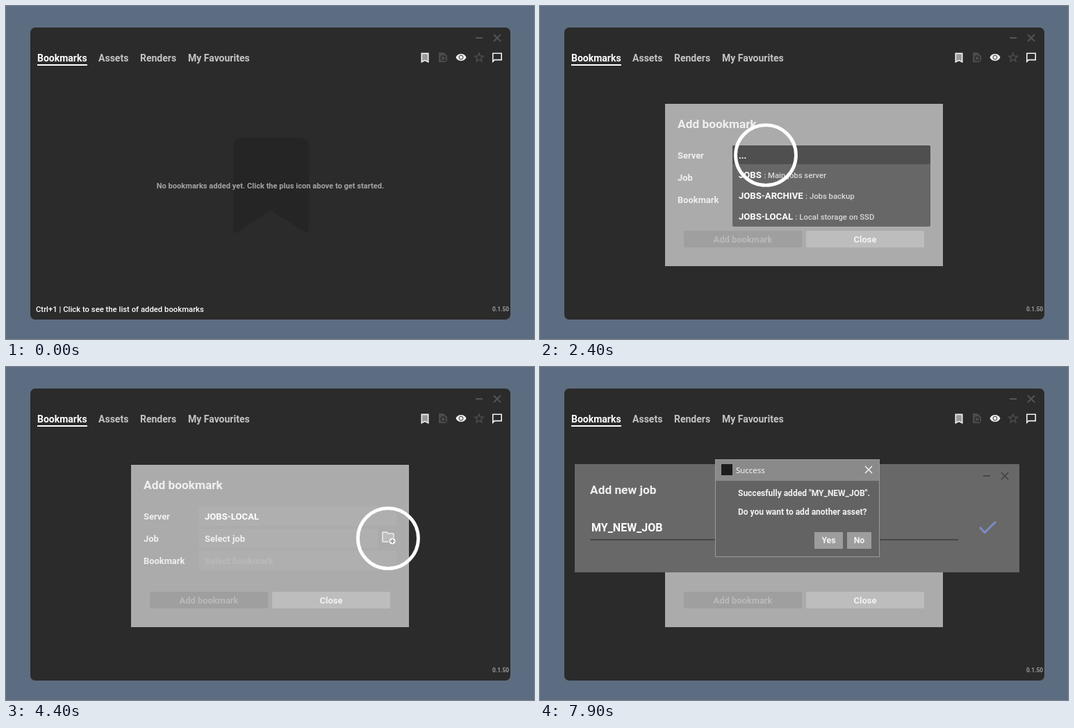
These frames come from a looping animation (760 px wide and 480 px high, 8000 ms). An HTML page with a canvas:

```html
<!DOCTYPE html>
<html lang="en">
<head>
<meta charset="utf-8">
<title>Adding a bookmark</title>
<style>
  html, body { margin: 0; width: 100%; height: 100%; overflow: hidden; background: #5d6d81; }
  canvas { display: block; }
</style>
</head>
<body>
<canvas id="stage" width="760" height="480"></canvas>
<script>
const ctx = document.getElementById('stage').getContext('2d');
const LOOP = 8000, STEP = 100;
const clamp = v => Math.max(0, Math.min(1, v));

function box(x, y, w, h, color, radius = 0) {
  ctx.fillStyle = color;
  ctx.beginPath();
  ctx.roundRect(x, y, w, h, radius);
  ctx.fill();
}

function text(str, x, y, size, color = '#fff', { weight = 700, align = 'left', family = 'Roboto' } = {}) {
  ctx.font = `${weight} ${size}px ${family}, sans-serif`;
  ctx.textAlign = align;
  ctx.fillStyle = color;
  ctx.fillText(str, x, y);
  return ctx.measureText(str).width;
}

// Draws an SVG-style path at an offset, filled and/or stroked.
function shape(x, y, d, { fill, stroke, width = 1.6 }) {
  const path = new Path2D(d);
  ctx.save();
  ctx.translate(x, y);
  if (fill) { ctx.fillStyle = fill; ctx.fill(path, 'evenodd'); }
  if (stroke) { ctx.strokeStyle = stroke; ctx.lineWidth = width; ctx.stroke(path); }
  ctx.restore();
}

// Runs draw() with a short fade that begins at the given time.
function appear(t, start, draw) {
  if (t < start) return;
  ctx.save();
  ctx.globalAlpha = clamp((t - start + 100) / 200);
  draw();
  ctx.restore();
}

function windowButtons(x, y, color) {
  shape(x, y, 'M-5 0h10', { stroke: color, width: 2 });
  shape(x + 26, y, 'M-5-5l10 10M5-5l-10 10', { stroke: color, width: 1.8 });
}

function toolbar() {
  const dim = '#4b4b4b', lit = '#f2f2f2';
  shape(603, 74.4, 'M-4.7-6h9.4v12.4l-4.7-2.4l-4.7 2.4z', { fill: '#9a9a9a', stroke: lit });
  shape(629, 74, 'M-6-7h7l5 5v8l-1 1h-11z', { fill: dim });
  shape(629, 74, 'M3.4 1.2a3.2 3.2 0 1 1-6.4 0a3.2 3.2 0 1 1 6.4 0M2.5 3.5l4 4', { stroke: '#2b2b2b', width: 1.4 });
  shape(655, 74, 'M-7.5 0C-5-6.6 5-6.6 7.5 0C5 6.6-5 6.6-7.5 0z', { fill: lit });
  shape(655, 74, 'M2.8 0a2.8 2.8 0 1 1-5.6 0a2.8 2.8 0 1 1 5.6 0', { stroke: '#555', width: 1.2 });
  shape(681, 74, 'M0-6l1.7 4l4.5.4l-3.4 3l1 4.4l-3.8-2.4l-3.8 2.4l1-4.4l-3.4-3l4.5-.4z', { stroke: dim });
  shape(707, 74.4, 'M-6.2-6.2h12.4v9.4h-10l-2.4 2.4z', { stroke: lit });
}

function mainWindow(t) {
  box(35, 31, 691, 421, '#2b2b2b', 7);
  windowButtons(681, 46, '#555');
  text('Bookmarks', 45, 80, 14);
  box(45, 84, 72, 2, '#fff');
  text('Assets', 133, 80, 14, '#c4c4c4');
  text('Renders', 193, 80, 14, '#c4c4c4');
  text('My Favourites', 262, 80, 14, '#c4c4c4');
  toolbar();
  shape(327, 190, 'M14 0H95Q109 0 109 14V134Q108 139 103 136L54 104L6 136Q0 139 0 134V14Q0 0 14 0z', { fill: '#252525' });
  text('No bookmarks added yet. Click the plus icon above to get started.', 380.5, 263, 11.1, '#a3a3a3', { align: 'center' });
  if (t < 300) text('Ctrl+1 | Click to see the list of added bookmarks', 43, 441, 11.3, '#fff', { weight: 500 });
  text('0.1.50', 724, 440, 8.4, '#9a9a9a', { align: 'right' });
}

function bookmarkDialog(t) {
  const picked = t >= 3600, hovered = t >= 1200 && !picked;
  const faint = '#bababa', bright = '#efefef', field = '#afafaf';
  box(180, 141, 400, 234, '#ababab');
  text('Add bookmark', 198, 176, 17.3, bright);
  ['Server', 'Job', 'Bookmark'].forEach((label, i) => text(label, 198, 220 + 32 * i, 12.9, bright));

  box(277, 201, 285, 28, hovered ? '#bcbcbc' : field, 2);
  text(picked ? 'JOBS-LOCAL' : 'Select server', 286, 220, 13.1);
  box(277, 233, picked ? 258 : 285, 28, field, 2);
  text('Select job', 286, 252, 13, picked ? bright : faint);
  box(277, 265, 285, 28, field, 2);
  text('Select bookmark', 286, 284, 13, faint);

  if (picked) {
    shape(541, 237, 'M1 2q0-1 1-1h5l2 2h7q1 0 1 1v10q0 1-1 1h-14q-1 0-1-1z', { fill: '#bdbdbd', stroke: '#eee', width: 1.5 });
    shape(556, 251, 'M5 0a5 5 0 1 1-10 0a5 5 0 1 1 10 0', { fill: '#fff', stroke: '#ababab', width: 1 });
    shape(556, 251, 'M-3 0h6M0-3v6', { stroke: '#888', width: 1.5 });
  }

  box(207, 324, 170, 24, '#9f9f9f', 2);
  text('Add bookmark', 292, 341, 12.9, faint, { align: 'center' });
  box(383, 324, 170, 24, '#bdbdbd', 2);
  text('Close', 468, 341, 13, '#f3f3f3', { align: 'center' });
}

function tooltip() {
  box(350, 232, 410, 41, '#4b4b4b');
  [
    'Click to select the server your job is located on.',
    'This should in most cases be the primary server (//GW-WORKSTATION/jobs),',
    'however, it is possible to work locally on the local SSD drive by selecting "jobs-local".'
  ].forEach((line, i) => text(line, 355, 244 + 13 * i, 11.2, '#f4f4f4'));
}

function serverList() {
  box(277, 201, 285, 117, '#676767', 2);
  box(277, 201, 285, 27, '#4f4f4f', 2);
  text('...', 286, 220, 13);
  [
    ['JOBS', 'Main jobs server'],
    ['JOBS-ARCHIVE', 'Jobs backup'],
    ['JOBS-LOCAL', 'Local storage on SSD']
  ].forEach(([name, note], i) => {
    const y = 248 + 30 * i;
    const width = text(name, 286, y, 13.1);
    text(': ' + note, 289.5 + width, y - 0.5, 11.3, '#d8d8d8', { weight: 500 });
  });
}

const keyTimes = [4600, 5100, 5700, 5900, 6200, 6600, 6700, 6800, 6900, 7000];

function jobDialog(t) {
  box(50, 140, 640, 156, '#686868');
  windowButtons(643, 157, '#484848');
  text('Add new job', 72, 183, 17.3, '#efefef');
  const typed = 'MY_NEW_JOB'.slice(0, keyTimes.filter(k => k <= t).length);
  const width = text(typed, 74, 237, 16);
  if (t < 7500) box(Math.round(74 + width), 222, 1, 19, '#fff');
  box(72, 248, 530, 2, '#474747');
  shape(633, 223, 'M0 8l7 7.5L23 0', { stroke: '#7c8cc2', width: 3 });
}

function successPopup(t) {
  if (t < 7500) {
    ctx.translate(370.5, 203.5);
    ctx.scale(0.97, 0.97);
    ctx.translate(-370.5, -203.5);
  }
  box(252, 133, 237, 141, '#9b9b9b');
  box(253, 134, 235, 139, '#636363');
  box(253, 134, 235, 30, '#8a8a8a');
  box(261, 140, 16, 16, '#1d1d1d');
  text('Success', 282, 153, 11.5, '#fff', { weight: 400, family: 'Open Sans' });
  shape(473, 148, 'M-5-5l10 10M5-5l-10 10', { stroke: '#fff', width: 1.3 });
  text('Succesfully added "MY_NEW_JOB".', 285, 186, 12, '#f2f2f2');
  text('Do you want to add another asset?', 285, 213, 12, '#f2f2f2');
  box(395, 238, 41, 24, '#9d9d9d');
  text('Yes', 415.5, 254, 12.3, '#f2f2f2', { align: 'center' });
  box(442, 238, 35, 24, '#9d9d9d');
  text('No', 459.5, 254, 12.3, '#f2f2f2', { align: 'center' });
}

const clicks = [
  { x: 603, y: 74, start: 500, end: 1400 },
  { x: 325, y: 215, start: 2100, end: 3000 },
  { x: 325, y: 303, start: 3300, end: 4200 },
  { x: 550, y: 247, start: 4100, end: 4700 },
  { x: 645, y: 231, start: 7000, end: 7900 }
];

function ripple(t, { x, y, start, end }) {
  if (t < start || t >= end) return;
  const p = (t - start + 40) / 900;
  ctx.beginPath();
  ctx.arc(x, y, 61.3 * (1 - (1 - p) ** 2.6), 0, 2 * Math.PI);
  ctx.strokeStyle = '#fff';
  ctx.lineWidth = 7 * (1 - p) + 0.5;
  ctx.stroke();
}

function draw(t) {
  box(0, 0, 760, 480, '#5d6d81');
  mainWindow(t);
  appear(t, 900, () => bookmarkDialog(t));
  if (t >= 1500 && t < 2100) tooltip();
  if (t >= 2300 && t < 3600) serverList();
  appear(t, 4500, () => jobDialog(t));
  appear(t, 7400, () => successPopup(t));
  clicks.forEach(click => ripple(t, click));
}

const begin = performance.now();
function tick() {
  const t = (performance.now() - begin) % LOOP;
  draw(Math.floor(t / STEP) * STEP);
  requestAnimationFrame(tick);
}
tick();
</script>
</body>
</html>
```
